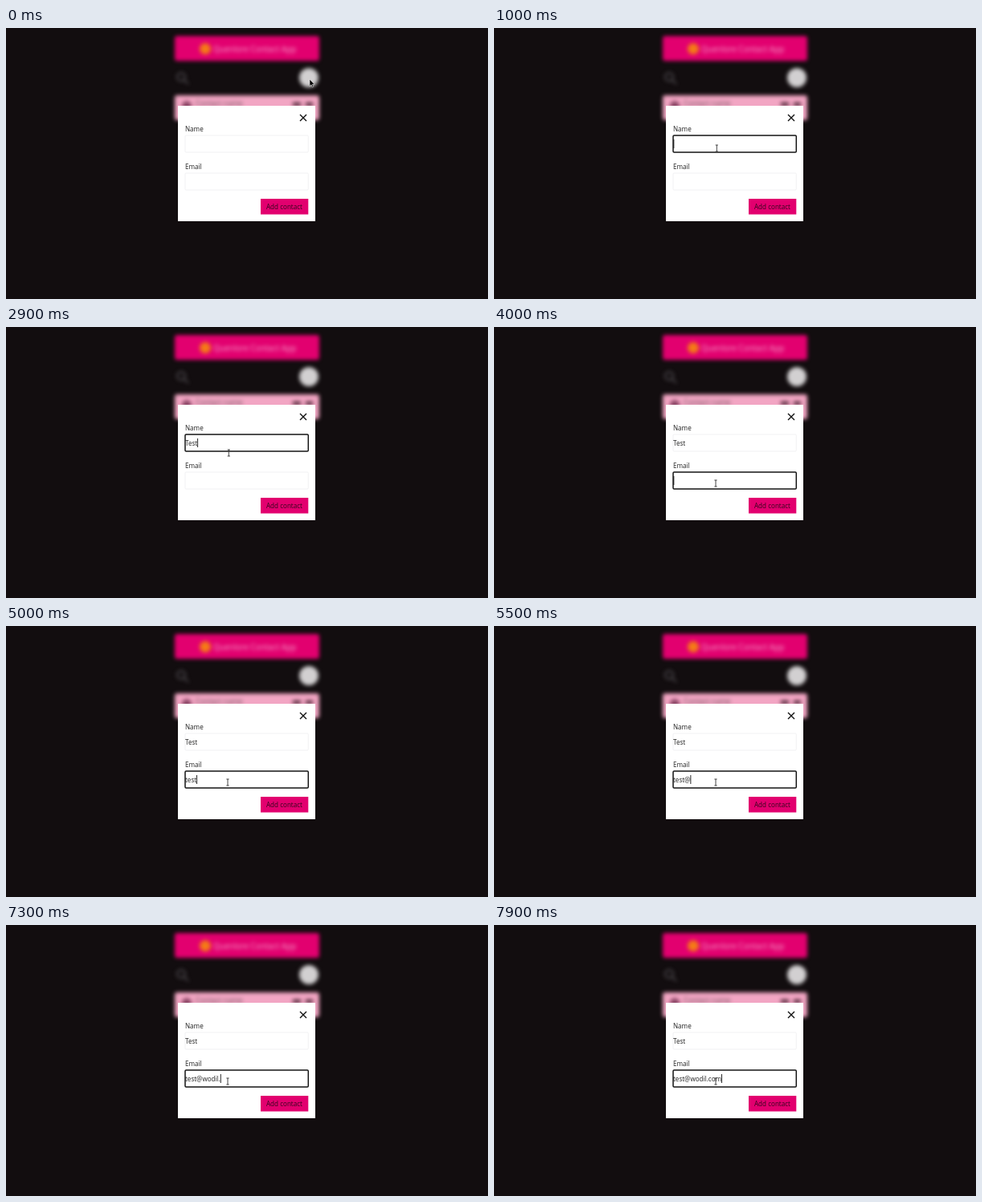
These frames come from a looping animation (600 by 338 pixels, 8000 ms). An HTML page:

```html
<!DOCTYPE html>
<html lang="en">
<head>
<meta charset="utf-8">
<title>Add contact form</title>
<style>
  html, body { margin: 0; width: 100%; height: 100%; overflow: hidden; background: #120d0f; }
  svg { display: block; width: 100vw; height: 100vh; }
  text { font: 8.1px "Open Sans", "Noto Sans", sans-serif; fill: #222; white-space: pre; }
  .backdrop { filter: blur(2.7px); }
  .field { fill: #fff; stroke: #eeeef0; stroke-width: .8; }
  .field.focus { stroke: #151515; stroke-width: 1.5; }
</style>
</head>
<body>
<svg viewBox="0 0 600 338">
  <rect width="600" height="338" fill="#120d0f"/>

  <g class="backdrop">
    <rect x="210" y="10" width="180" height="31" rx="3" fill="#e2006f"/>
    <circle cx="248" cy="26" r="7" fill="#f47a16"/>
    <text x="258" y="29.5" style="font-size:10px;fill:#fff" opacity=".65">Quenlore Contact App</text>
    <g fill="none" stroke="#77757a" stroke-width="1.5" opacity=".75">
      <circle cx="218" cy="61" r="5"/>
      <path d="M222 65l5 5"/>
    </g>
    <circle cx="377" cy="62" r="12" fill="#d2d0d1"/>
    <rect x="210" y="84" width="180" height="31" rx="3" fill="#f2a5c3"/>
    <circle cx="225" cy="97" r="6" fill="#8a4565"/>
    <text x="236" y="97" style="font-size:9px" opacity=".7">Contact name</text>
    <path d="M357 95h10M373 95h9" stroke="#401c2c" stroke-width="4"/>
  </g>

  <rect x="214" y="97" width="171" height="144" fill="#fff"/>
  <path d="M366 108l8 8m0-8l-8 8" stroke="#111" stroke-width="1.4"/>
  <text x="223" y="128.8">Name</text>
  <text x="223" y="175.8">Email</text>
  <rect class="field" x="223" y="134" width="153.3" height="21" rx="1.2"/>
  <rect class="field" x="223" y="181" width="153.3" height="21" rx="1.2"/>
  <text class="value" x="223" y="147.9"></text>
  <text class="value" x="223" y="194.9"></text>
  <rect x="317" y="213" width="59.3" height="19.5" fill="#e2006f"/>
  <text x="324" y="226.4" style="fill:#35051d">Add contact</text>

  <rect id="caret" width=".9" height="11" fill="#111"/>
  <path id="arrow" d="M0 0V8.6L2 6.8 3.4 9.8 4.7 9.2 3.4 6.3H6Z" fill="#080808" stroke="#eee" stroke-width=".5"/>
  <path id="beam" d="M-1.6-4H1.6M0-4V4M-1.6 4H1.6" fill="none" stroke="#333" stroke-width=".9"/>
</svg>
<script>
const LOOP = 8000;
const $ = selector => document.querySelector(selector);
const fields = document.querySelectorAll('.field');
const values = document.querySelectorAll('.value');
const caret = $('#caret'), arrow = $('#arrow'), beam = $('#beam');

// Each value is typed one character per time stamp.
const entries = [
  { text: 'Test', times: [1300, 1400, 1500, 1800] },
  { text: 'test@wodil.com',
    times: [4500, 4600, 4800, 5000, 5500, 6400, 6600, 6600, 6900, 7000, 7300, 7500, 7600, 7700] }
];
const NAME_FOCUS = 500, EMAIL_FOCUS = 3900;
const caretOff = [[2300, 2800], [3400, 3900], [6100, 6400]];

// [time, x, y, shape], held until the next entry
const pointer = [
  [0, 378, 64, arrow], [100, 374, 67, arrow], [300, 345, 106, arrow],
  [400, 300, 141, beam], [500, 280, 148, beam], [800, 277.3, 150, beam],
  [2800, 277.3, 157, beam], [3400, 277, 176, beam], [3500, 277, 208, beam],
  [3800, 276.5, 200, beam], [3900, 276, 195, beam]
];

const show = (element, visible) =>
  element.setAttribute('visibility', visible ? 'visible' : 'hidden');

function draw(t) {
  const focus = t < NAME_FOCUS ? -1 : t < EMAIL_FOCUS ? 0 : 1;
  entries.forEach(({ text, times }, i) => {
    values[i].textContent = text.slice(0, times.filter(time => time <= t).length);
    fields[i].classList.toggle('focus', i === focus);
  });

  show(caret, focus >= 0 && !caretOff.some(([from, to]) => t >= from && t < to));
  if (focus >= 0) {
    const value = values[focus];
    const width = value.textContent ? value.getComputedTextLength() : 0.4;
    caret.setAttribute('x', 223 + width);
    caret.setAttribute('y', focus ? 186 : 139);
  }

  const [, x, y, shape] = pointer.filter(([time]) => time <= t).pop();
  show(arrow, shape === arrow);
  show(beam, shape === beam);
  shape.setAttribute('transform', `translate(${x} ${y})`);
}

const start = performance.now();
function tick() {
  draw((performance.now() - start) % LOOP);
  requestAnimationFrame(tick);
}
tick();
</script>
</body>
</html>
```
